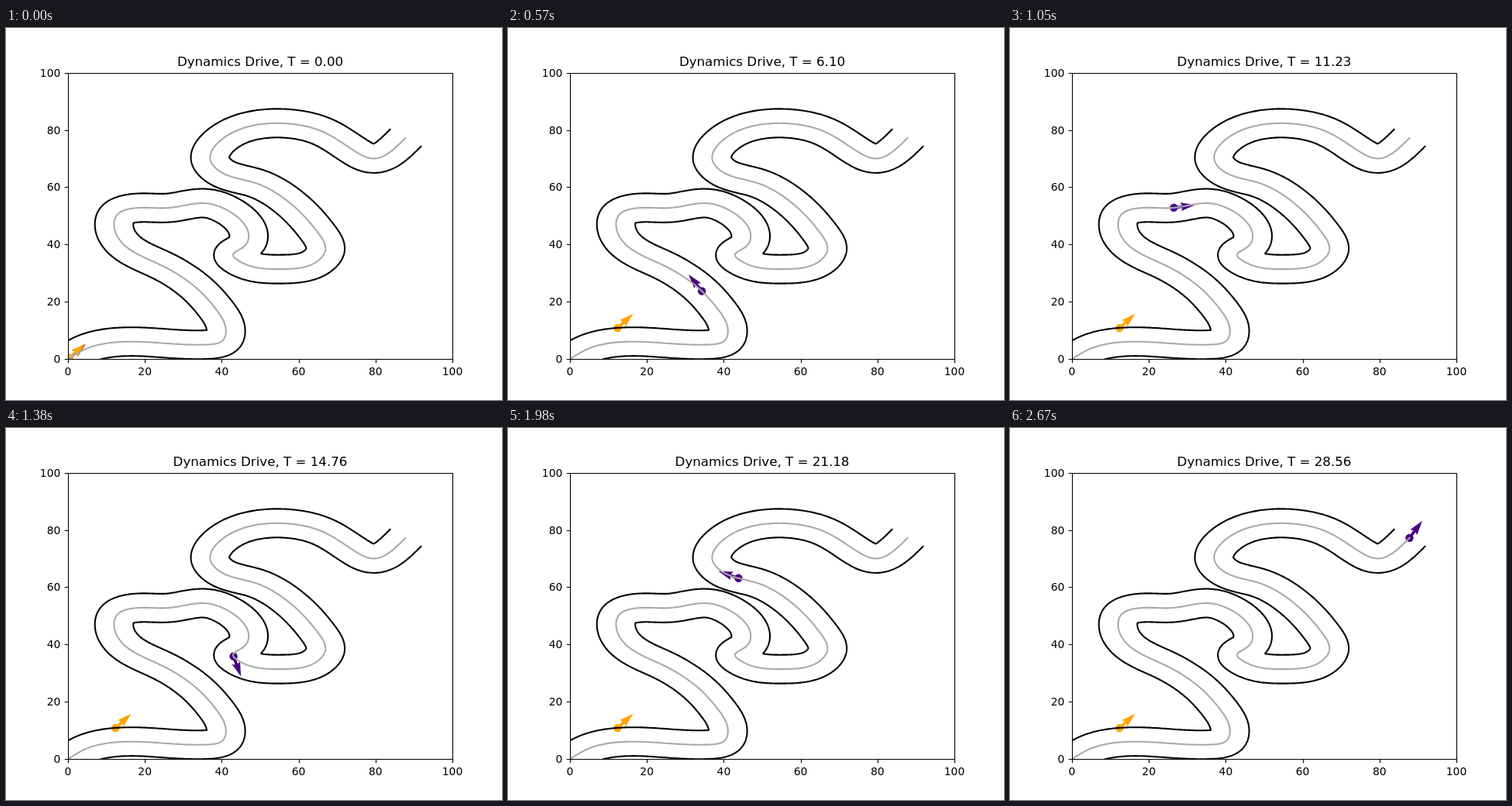
Write an HTML page that moves like this. It is 640 px wide and 480 px high and loops after 2.7 s.

```html
<!DOCTYPE html>
<html lang="en">
<head>
<meta charset="utf-8">
<title>Dynamics Drive</title>
<style>
  html, body { margin: 0; width: 100%; height: 100%; overflow: hidden; background: #fff; }
  svg { display: block; width: 640px; height: 480px; }
  text { font: 13.89px "DejaVu Sans", sans-serif; }
  #title { font-size: 16.67px; text-anchor: middle; }
  #track path { fill: none; stroke: #000; stroke-width: 2.08; stroke-linecap: square; stroke-linejoin: round; }
  #track .mid { stroke: darkgray; }
  #axes path { fill: none; stroke: #000; stroke-width: 1.11; }
</style>
</head>
<body>
<svg viewBox="0 0 640 480">
  <defs>
    <clipPath id="plot"><rect x="80" y="57.6" width="496" height="369.6"/></clipPath>
    <g id="car">
      <circle r="5.2"/>
      <path d="M0-1.86H10.81L8.95-5.58L27.55 0L8.95 5.58L10.81 1.86H0Z"/>
    </g>
  </defs>
  <g clip-path="url(#plot)">
    <use id="follower" href="#car" fill="indigo"/>
    <use id="straight" href="#car" fill="orange"/>
    <g id="track"></g>
  </g>
  <g id="axes"></g>
  <text id="title" x="328" y="49"></text>
</svg>
<script>
const STEP = 30, FRAMES = 90, DT = 0.3209;
const HALF = 5, SUB = 36;
const $ = id => document.getElementById(id);
const toPx = ([x, y]) => [80 + x * 4.96, 427.2 - y * 3.696];
const dist = (a, b) => Math.hypot(a[0] - b[0], a[1] - b[1]);

function add(parent, tag, attrs, text = '') {
  const el = document.createElementNS('http://www.w3.org/2000/svg', tag);
  for (const k in attrs) el.setAttribute(k, attrs[k]);
  el.textContent = text;
  parent.append(el);
}

// Key points of the centre line, in axis units
const way = `0 0, 5 3.75, 14.5 6.05, 35.9 5.05, 40.1 6.3, 41.07 9.25, 38.5 17.4,
  34.2 23.85, 24.2 32.8, 14.9 39.5, 12 46.6, 13.1 50.8, 17.3 52.7, 26.2 52.8,
  35.7 54.4, 42.3 51.3, 47 43.4, 45.5 39, 42.95 36.4, 44.8 34, 55 31.4, 64 33.4,
  66.95 38, 65.1 44, 56.9 55.4, 48.4 61.6, 40 65.1, 37.05 69.5, 40.3 77, 54.8 82.35,
  65.5 79.8, 73.6 73.5, 79 70.05, 87.8 77.2`
  .split(',').map(p => p.trim().split(' ').map(Number));

// Second derivatives of a natural cubic spline
function curvature(t, v) {
  const n = t.length, m = Array(n).fill(0), c = Array(n).fill(0);
  for (let i = 1; i < n - 1; i++) {
    const a = t[i] - t[i - 1], b = t[i + 1] - t[i];
    const r = 6 * ((v[i + 1] - v[i]) / b - (v[i] - v[i - 1]) / a);
    const d = 2 * (a + b) - a * c[i - 1];
    c[i] = b / d;
    m[i] = (r - a * m[i - 1]) / d;
  }
  for (let i = n - 2; i > 0; i--) m[i] -= c[i] * m[i + 1];
  return m;
}

const knots = [0];
for (let i = 1; i < way.length; i++) knots.push(knots[i - 1] + dist(way[i], way[i - 1]));
const bend = [0, 1].map(k => curvature(knots, way.map(p => p[k])));

function splineAt(i, u) {
  const h = knots[i + 1] - knots[i], w = 1 - u;
  const pos = [], vel = [];
  for (const k of [0, 1]) {
    const a = way[i][k], b = way[i + 1][k], ma = bend[k][i], mb = bend[k][i + 1];
    pos.push(w * a + u * b + h * h / 6 * ((w ** 3 - w) * ma + (u ** 3 - u) * mb));
    vel.push((b - a) / h + h / 6 * ((1 - 3 * w * w) * ma + (3 * u * u - 1) * mb));
  }
  return { pos, vel };
}

const line = [];
for (let i = 0; i < way.length - 1; i++)
  for (let j = 0; j < SUB; j++) line.push(splineAt(i, j / SUB));
line.push(splineAt(way.length - 2, 1));
line.forEach((p, i) => p.s = i ? line[i - 1].s + dist(p.pos, line[i - 1].pos) : 0);
const total = line[line.length - 1].s;

// Parallel curve without the parts that fold back into the track
function edge(side) {
  return line.map(({ pos: [x, y], vel: [u, v] }) => {
    const k = side * HALF / Math.hypot(u, v);
    return [x - v * k, y + u * k];
  }).filter(q => line.every(p => dist(p.pos, q) > HALF - 0.01));
}

const pathOf = pts => 'M' + pts.map(p => toPx(p).map(n => n.toFixed(2)).join(' ')).join('L');
add($('track'), 'path', { class: 'mid', d: pathOf(line.map(p => p.pos)) });
for (const side of [1, -1]) add($('track'), 'path', { d: pathOf(edge(side)) });

// Frame and ticks
const snap = v => Math.floor(v + 0.5) + 0.5;
let frame = 'M80.5 58.5H576.5V427.5H80.5Z';
for (let v = 0; v <= 100; v += 20) {
  const [x, y] = toPx([v, v]);
  frame += `M${snap(x)} 427.5v4.86M80.5 ${snap(y)}h-4.86`;
  add($('axes'), 'text', { x, y: 448, 'text-anchor': 'middle' }, v);
  add($('axes'), 'text', { x: 70.3, y: Math.round(y + 5), 'text-anchor': 'end' }, v);
}
add($('axes'), 'path', { d: frame });

function pointAt(s) {
  s = Math.max(0, Math.min(total, s));
  const i = Math.max(1, line.findIndex(p => p.s >= s));
  const a = line[i - 1], b = line[i], f = (s - a.s) / (b.s - a.s);
  return a.pos.map((v, k) => v + (b.pos[k] - v) * f);
}

function place(el, p, angle) {
  const [x, y] = toPx(p);
  el.setAttribute('transform', `translate(${x} ${y}) rotate(${-angle})`);
}

// Both cars drive at one steady speed; the straight one halts at the track edge
const LEAD = 0.05, END = (FRAMES - 1) * DT + LEAD;
const SPEED = total / END;
const HALT = [12.35, 10.8], REACH = Math.hypot(...HALT);

function draw(n) {
  const time = n * DT, s = (time + LEAD) * SPEED;
  const a = pointAt(s - 0.7), b = pointAt(s + 0.7);
  place($('follower'), pointAt(s), Math.atan2(b[1] - a[1], b[0] - a[0]) * 180 / Math.PI);
  const k = Math.min(1, s / REACH);
  place($('straight'), HALT.map(v => v * k), 42.5);
  $('title').textContent = `Dynamics Drive, T = ${time.toFixed(2)}`;
}

const start = performance.now();
function tick() {
  draw(Math.floor((performance.now() - start) / STEP) % FRAMES);
  requestAnimationFrame(tick);
}
tick();
</script>
</body>
</html>
```
